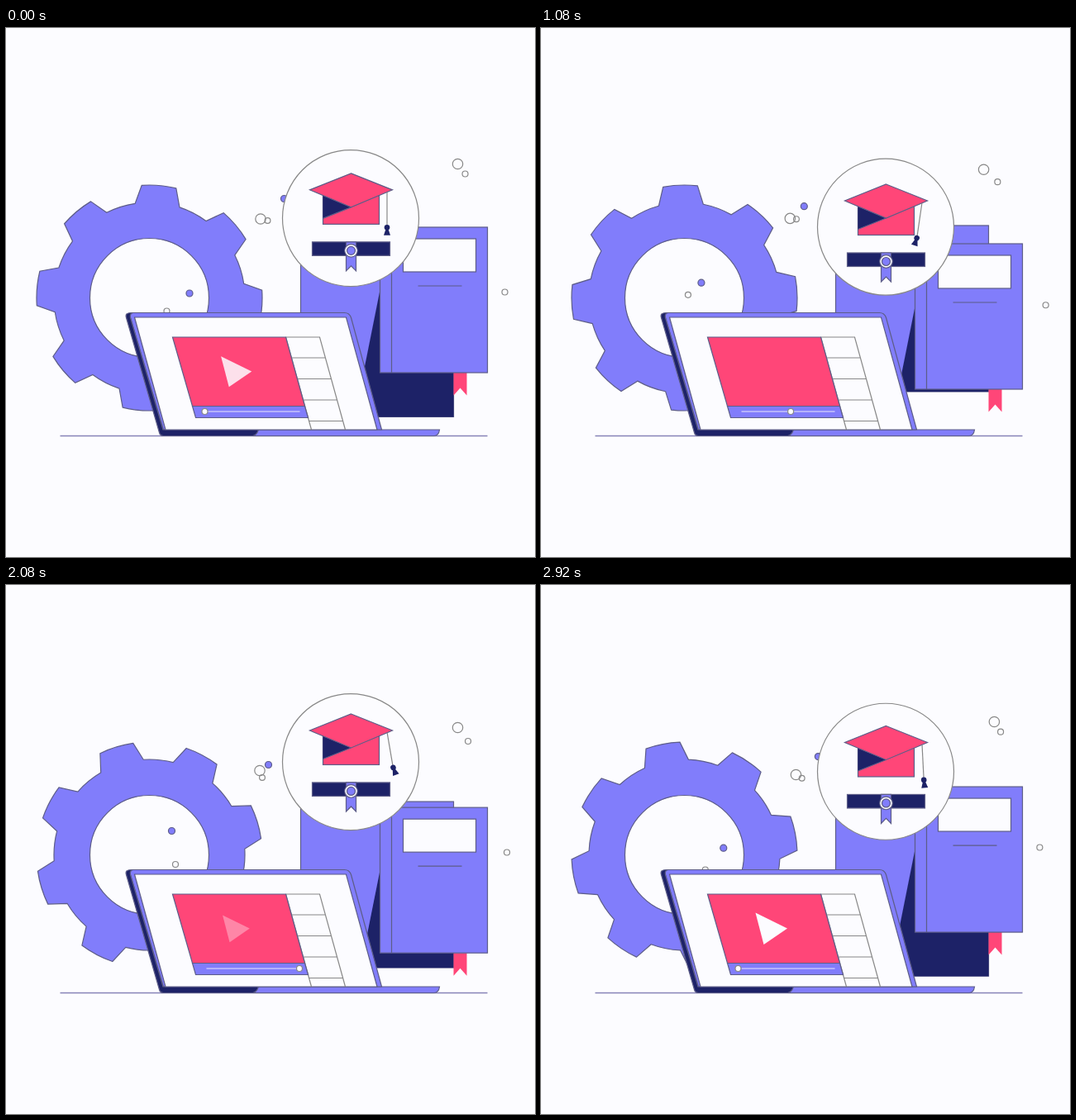
Recreate the animation shown at these times as an HTML page. Size 640x640 px, loop 3.01 s.

```html
<!DOCTYPE html>
<html lang="en">
<head>
<meta charset="utf-8">
<title>Online learning</title>
<style>
  html, body { margin: 0; width: 100%; height: 100%; overflow: hidden; background: #fcfcff; }
  svg { display: block; width: 100%; height: 100%; }
  .violet { fill: #817dfb; }
  .navy { fill: #1d2267; }
  .red { fill: #ff4678; }
  .paper { fill: #fcfcff; }
  .edge { stroke: #5d5d88; stroke-width: 1.2; }
  .thin { stroke: #888888; stroke-width: 1.2; }
  .line { fill: none; }
</style>
</head>
<body>
<svg viewBox="0 0 640 640">
  <clipPath id="backClip"><rect id="backClipRect" x="356" width="185" height="201"/></clipPath>

  <g transform="translate(0.5 0.5)">
    <path d="M65 493H582" stroke="#8784b8" stroke-width="1.300"/>

    <g transform="translate(173 326)">
      <path id="gear" class="violet edge"/>
      <circle class="paper edge" r="72"/>
    </g>

    <g id="dots"></g>

    <rect id="back" class="violet edge" x="356" width="185" height="201"/>
    <g clip-path="url(#backClip)"><path id="shadow" class="navy" d="M452 76L412 276H582V76Z"/></g>

    <g id="front">
      <path class="red" d="M541 176V203.500L549 194.500L557 203.500V176Z"/>
      <rect class="violet edge" x="452" y="0" width="130" height="176"/>
      <path class="edge line" d="M466 0V176M498 71H551"/>
      <rect class="paper edge" x="480" y="14" width="88" height="40"/>
    </g>

    <circle id="badge" class="paper thin" cx="416.500" r="82.500"/>
    <g id="award">
      <rect class="red edge" x="383" y="27" width="68" height="34.500"/>
      <path class="navy" d="M383 27L417 41L383 54.500Z"/>
      <path class="edge line" d="M417 41L383 54.500"/>
      <path class="red edge" d="M417 0L467 20L417 41L367 20Z"/>
      <g id="tassel">
        <path class="thin" d="M460.500 23V65"/>
        <g id="tuft">
          <circle class="navy" cx="460.500" cy="65.500" r="3.300"/>
          <path class="navy" d="M459.500 66H461.500L464.500 75H456.500Z"/>
        </g>
      </g>
      <rect class="navy edge" x="370" y="83" width="94" height="16.500"/>
      <path class="violet edge" d="M411 83H423V118L417 112L411 118Z"/>
      <circle class="paper edge" cx="417" cy="93.500" r="7.800"/>
      <circle class="violet edge" cx="417" cy="93.500" r="5"/>
    </g>

    <g>
      <path class="violet edge" d="M190 485.500H524Q523 493 517 493H190Z"/>
      <path class="violet edge" d="M153 344H409Q415 344 417 350L454 485.500H190L150 350Q149 344 153 344Z"/>
      <path class="navy edge" d="M151 344Q143 344 145 350L185 489Q186 493 190 493H298Q303 492 305 485.500H189.500L150 350Q149 345 153 344Z"/>
      <path class="paper edge" d="M155 349.500H411L448.500 485.500H192.500Z"/>
      <path class="thin line" d="M338 373.500H379L410 485.500M338 373.500L369 485.500M345 398.500H386M352 424H393M359 449.500H400M366 475H407"/>
      <path class="red edge" d="M201 373.500H338L361 457H225Z"/>
      <path class="violet edge" d="M225 457H361L365 471H229Z"/>
      <path d="M242 463.500H355" stroke="#c9c6fa" stroke-width="1.300"/>
      <circle id="knob" class="paper thin" cy="463.500" r="3.500"/>
      <path id="play" class="paper" d="M-17 -19.500L21.500 -0.500L-7 19Z"/>
    </g>
  </g>
</svg>
<script>
const LOOP = 3010, STEPS = 45;
const el = id => document.getElementById(id);
const set = (node, attrs) => { for (const a in attrs) node.setAttribute(a, attrs[a]); };
const clamp = v => Math.max(0, Math.min(1, v));
const wave = deg => Math.sin(deg * Math.PI / 180);
const shift = (id, y) => set(el(id), { transform: `translate(0 ${y})` });
const turn = (id, deg, x, y) => set(el(id), { transform: `rotate(${deg} ${x} ${y})` });

function gearPath() {
  const at = (r, deg) => `${(r * wave(deg)).toFixed(2)} ${(-r * wave(deg + 90)).toFixed(2)}`;
  const root = 115.5, tip = 136.5;
  let d = `M${at(root, -13.5)}`;
  for (let a = 0; a < 360; a += 45) {
    d += `L${at(tip, a - 8.8)}A${tip} ${tip} 0 0 1 ${at(tip, a + 8.8)}`;
    d += `L${at(root, a + 13.5)}A${root} ${root} 0 0 1 ${at(root, a + 31.5)}`;
  }
  return d + 'Z';
}

// Periodic swing: value a at angle angA, eased to b at angB, eased back.
function swing(deg, angA, a, angB, b) {
  const there = (angB - angA + 360) % 360, pos = (deg - angA + 360) % 360;
  const u = pos < there ? pos / there : 1 - (pos - there) / (360 - there);
  return a + (b - a) * (1 - Math.cos(Math.PI * u)) / 2;
}

// Drifting dots: closed smooth paths through shared waypoint times.
const KNOTS = [0, 6, 12, 21, 31, 39];
const DOTS = [
  { r: 4, solid: true, x: [221.5, 213, 199.5, 190, 200, 214], y: [320.5, 319.5, 314, 300, 297, 309.5] },
  { r: 3.5, x: [194, 177.5, 173, 187, 204.5, 204.5], y: [342, 329.5, 322.5, 325.5, 337.5, 345] },
  { r: 4, solid: true, x: [336, 330, 323, 313, 317, 329.5], y: [206, 207, 212, 218, 217, 210.5] },
  { r: 6.2, x: [307.5, 304, 301, 302, 306.5, 308], y: [230.5, 231.5, 231, 228, 224, 225.5] },
  { r: 3.4, x: [316, 314.5, 310.5, 307, 309.5, 312.5], y: [232.5, 230.5, 230.5, 231, 232.5, 234.5] },
  { r: 6.2, x: [546, 537.5, 534, 538.5, 546, 550], y: [164, 167, 170, 171, 172, 168.5] },
  { r: 3.5, x: [555, 552.5, 551, 554, 558.5, 556.5], y: [176, 179, 182.5, 189, 188.5, 181.5] },
  { r: 3.5, x: [603, 606, 609.5, 609.5, 605.5, 603.5], y: [319, 327.5, 333.5, 333.5, 323, 315] }
];

function drift(values, k) {
  const n = KNOTS.length, wrap = i => (i + n) % n;
  const span = i => (KNOTS[wrap(i + 1)] - KNOTS[wrap(i)] + STEPS) % STEPS;
  const slope = i => (values[wrap(i + 1)] - values[wrap(i)]) / span(i);
  const tangent = i => (span(i) * slope(i - 1) + span(i - 1) * slope(i)) / (span(i - 1) + span(i));
  let i = n - 1;
  while (KNOTS[i] > k) i--;
  const h = span(i), u = (k - KNOTS[i]) / h, v = 1 - u;
  return values[i] * v * v * (1 + 2 * u) + values[wrap(i + 1)] * u * u * (3 - 2 * u)
    + h * u * v * (v * tangent(i) - u * tangent(i + 1));
}

for (const dot of DOTS) {
  dot.node = document.createElementNS('http://www.w3.org/2000/svg', 'circle');
  set(dot.node, { r: dot.r, class: dot.solid ? 'violet edge' : 'thin line' });
  el('dots').append(dot.node);
}
set(el('gear'), { d: gearPath() });

function draw(ms) {
  // The picture holds at 12 steps a second, sampled from a 45-step cycle.
  const hold = Math.floor((ms + 5) / 83.34);
  const k = Math.min(43, Math.max(0, Math.ceil(hold * 1.25 - 0.5)));
  const deg = k * 360 / STEPS;

  turn('gear', 4.9 + deg, 0, 0);

  const bob = wave(deg + 4);
  set(el('badge'), { cy: 228.5 + 15.7 * bob });
  shift('award', 174 + 19.5 * bob);
  turn('tassel', 10.5 * wave(deg), 460.5, 22);
  turn('tuft', 12 * wave(deg), 460.5, 65);

  const frontTop = swing(deg, 41, 237, 192, 275);
  const backTop = swing(deg, 306, 274.6, 160, 236.4);
  shift('front', frontTop);
  shift('shadow', frontTop);
  set(el('back'), { y: backTop });
  set(el('backClipRect'), { y: backTop });

  const late = k > 38;
  set(el('knob'), {
    cx: late ? 238 : Math.min(354.5, 240 + 3.85 * k),
    opacity: late ? clamp((k - 40) / 3) : clamp((36 - k) / 4)
  });
  const shown = k < 20 ? clamp(1 - (k + 0.7) / 4.7) : clamp((k - 29.4) / 4.6);
  set(el('play'), { opacity: shown, transform: `translate(276 415.500) scale(${0.77 + 0.23 * shown})` });

  for (const { node, x, y } of DOTS) set(node, { cx: drift(x, k), cy: drift(y, k) });
}

const start = performance.now();
function tick() {
  draw((performance.now() - start) % LOOP);
  requestAnimationFrame(tick);
}
tick();
</script>
</body>
</html>
```
